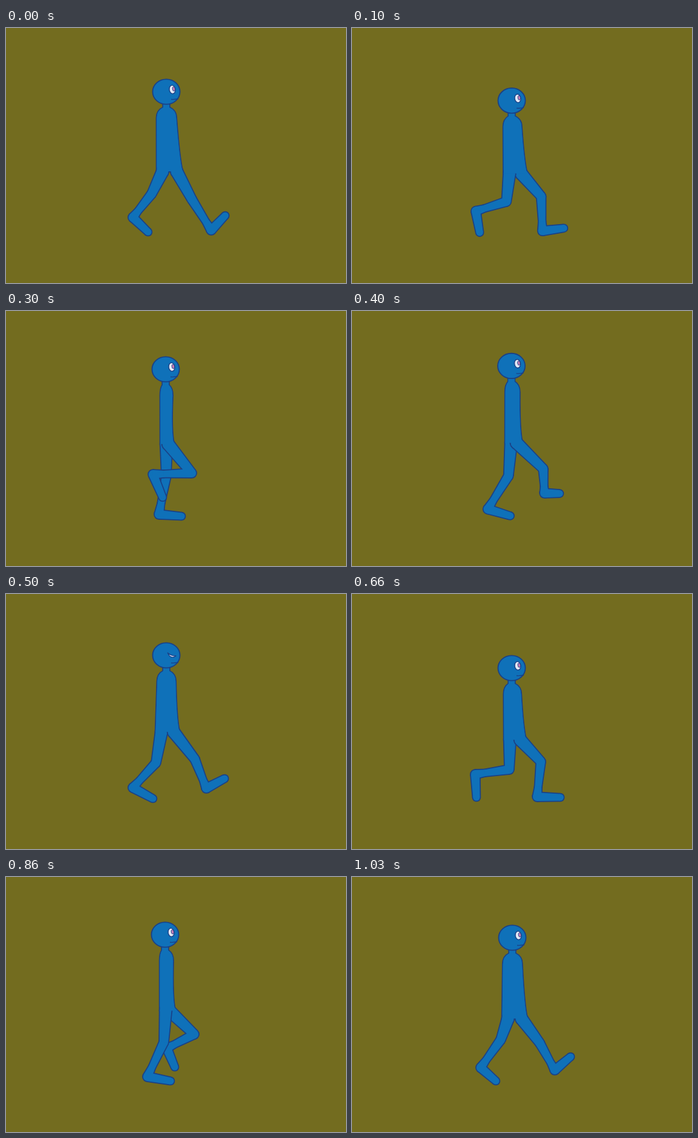
An HTML page with a canvas for the animation above (1.06 s loop, 560 by 420 pixels).

```html
<!DOCTYPE html>
<html lang="en">
<head>
<meta charset="utf-8">
<title>Walk cycle</title>
<style>
  html, body { margin: 0; height: 100%; overflow: hidden; background: #736c1f; }
  canvas { display: block; }
</style>
</head>
<body>
<canvas id="stage" width="560" height="420"></canvas>
<script>
const ctx = document.getElementById('stage').getContext('2d');
const BACK = '#736c1f', BLUE = '#0f71b9', INK = '#1a4187';
const LOOP = 1060, STEPS = 32, HALF = STEPS / 2;
const RADII = [9.5, 7.1, 5.4, 7.1, 5.6]; // hip, knee, ankle, heel, toe

// step, head x y, hip y, then per leg (near, far): hip x, knee, heel, toe
const POSES = [
  [0, 264, 105, 236, 258, 240, 273, 209, 312, 234, 336, 281, 306, 282, 338, 333, 361, 309],
  [6, 265, 111, 237, 263, 264, 288, 205, 281, 213, 317, 270, 293, 279, 288, 335, 322, 338],
  [9, 263, 96, 219, 267, 306, 267, 242, 269, 258, 307, 264, 264, 272, 252, 335, 289, 338],
  [13, 263, 90, 217, 272, 316, 262, 336, 308, 366, 296, 261, 256, 272, 220, 325, 256, 338],
  [15, 264, 101, 227, 276, 311, 272, 330, 320, 360, 304, 256, 247, 278, 209, 319, 242, 337],
  [20, 263, 122, 240, 277, 311, 276, 305, 334, 343, 335, 260, 259, 289, 203, 297, 205, 335],
  [26, 262, 95, 220, 263, 260, 272, 233, 329, 271, 336, 269, 310, 259, 265, 282, 278, 313],
  [31, 264, 100, 233, 257, 245, 268, 212, 314, 237, 336, 279, 309, 273, 334, 318, 360, 296]
];

// Each pose also serves half a cycle later with the legs exchanged.
const keys = POSES.flatMap(([t, ...p]) => {
  const swapped = [...p.slice(0, 3), ...p.slice(10), ...p.slice(3, 10)];
  const own = { t, p };
  return t % HALF === 15 ? [own] : [own, { t: (t + HALF) % STEPS, p: swapped }];
}).sort((a, b) => a.t - b.t);

function keyAt(n) {
  const count = keys.length, turn = Math.floor(n / count);
  const key = keys[n - turn * count];
  return { t: key.t + turn * STEPS, p: key.p };
}

// Smooth curve through the unevenly spaced keys
function poseAt(step) {
  const n = keys.findLastIndex(k => k.t <= step);
  const [a, b, c, d] = [-1, 0, 1, 2].map(k => keyAt(n + k));
  const span = c.t - b.t, u = (step - b.t) / span;
  return b.p.map((v, i) => {
    const m0 = (c.p[i] - a.p[i]) / (c.t - a.t) * span;
    const m1 = (d.p[i] - v) / (d.t - b.t) * span;
    const w = c.p[i];
    return v + u * (m0 + u * (3 * (w - v) - 2 * m0 - m1 + u * (2 * (v - w) + m0 + m1)));
  });
}

function stepAt(ms) {
  const t = Math.floor(ms / 10) * 10;
  return t < 560 ? Math.floor((t + 3.4) * 0.03) : 17 + Math.floor((t - 560) * 0.03);
}

function legPoints([hip, kx, ky, hx, hy, tx, ty], hipY) {
  const ankle = [kx + (hx - kx) * 0.72, ky + (hy - ky) * 0.72];
  return [[hip, hipY], [kx, ky], ankle, [hx, hy], [tx, ty]];
}

function drawLeg(points, color, grow) {
  ctx.fillStyle = color;
  points.forEach(([x, y], i) => {
    const r = RADII[i] + grow;
    ctx.beginPath();
    ctx.arc(x, y, r, 0, 7);
    ctx.fill();
    if (!i) return;
    const [px, py] = points[i - 1], pr = RADII[i - 1] + grow;
    const len = Math.hypot(x - px, y - py) || 1;
    const nx = (py - y) / len, ny = (x - px) / len;
    ctx.beginPath();
    ctx.moveTo(px + nx * pr, py + ny * pr);
    ctx.lineTo(x + nx * r, y + ny * r);
    ctx.lineTo(x - nx * r, y - ny * r);
    ctx.lineTo(px - nx * pr, py - ny * pr);
    ctx.fill();
  });
}

function torsoPath(hx, hy, hipY, hipA, hipB) {
  const left = Math.min(hipA, hipB) - 9.5, right = Math.max(hipA, hipB) + 9.5;
  const wide = 9 + 0.3 * Math.abs(hipA - hipB), mid = 264.3;
  const path = new Path2D();
  path.moveTo(hx - 5, hy + 15);
  path.lineTo(hx - 5, hy + 26);
  path.quadraticCurveTo(mid - wide, hy + 31, mid - wide, hy + 43);
  path.lineTo(left, hipY);
  path.lineTo(right, hipY);
  path.quadraticCurveTo(right - 5, hipY - 20, mid + wide, hy + 43);
  path.quadraticCurveTo(mid + wide, hy + 31, hx + 5, hy + 26);
  path.lineTo(hx + 5, hy + 15);
  return path;
}

function oval(x, y, rx, ry, fill, line, tilt = 0) {
  ctx.beginPath();
  ctx.ellipse(x, y, rx, ry, tilt, 0, 7);
  ctx.fillStyle = fill;
  ctx.fill();
  ctx.strokeStyle = INK;
  ctx.lineWidth = line;
  ctx.stroke();
}

function drawHead(x, y, step) {
  oval(x, y, 22.5, 20.7, BLUE, 1.8);
  ctx.lineWidth = 1.3;
  ctx.beginPath();
  ctx.moveTo(x + 8, y + 12.5);
  ctx.quadraticCurveTo(x + 14, y + 13, x + 20, y + 11.5);
  ctx.stroke();
  if (Math.abs(step - 15) < 2) {
    ctx.beginPath();
    ctx.moveTo(x + 2, y - 4.5);
    ctx.quadraticCurveTo(x + 7, y + 1, x + 16, y + 1);
    ctx.quadraticCurveTo(x + 7, y + 7, x + 2, y - 4.5);
    ctx.fillStyle = '#e3e8f5';
    ctx.fill();
    ctx.stroke();
    return;
  }
  oval(x + 10, y - 3.7, 5, 7, '#e3e8f5', 1.4, -0.15);
  oval(x + 12.3, y - 4.7, 2.1, 3.6, '#cf7fb8', 1, -0.15);
}

function draw(now) {
  const step = stepAt(now % LOOP), pose = poseAt(step);
  const [hx, hy, hipY] = pose;
  const near = legPoints(pose.slice(3, 10), hipY);
  const far = legPoints(pose.slice(10), hipY);
  const torso = torsoPath(hx, hy, hipY, pose[3], pose[10]);

  ctx.fillStyle = BACK;
  ctx.fillRect(0, 0, 560, 420);
  drawLeg(far, INK, 1.7);
  ctx.strokeStyle = INK;
  ctx.lineWidth = 3.4;
  ctx.lineJoin = 'round';
  ctx.stroke(torso);
  drawLeg(far, BLUE, 0);
  ctx.fill(torso);
  drawLeg(near, INK, 1.7);
  drawLeg(near, BLUE, 0);
  ctx.fill(torso);
  drawHead(hx, hy, step);
}

const start = performance.now();
function tick() {
  draw(performance.now() - start);
  requestAnimationFrame(tick);
}
tick();
</script>
</body>
</html>
```
